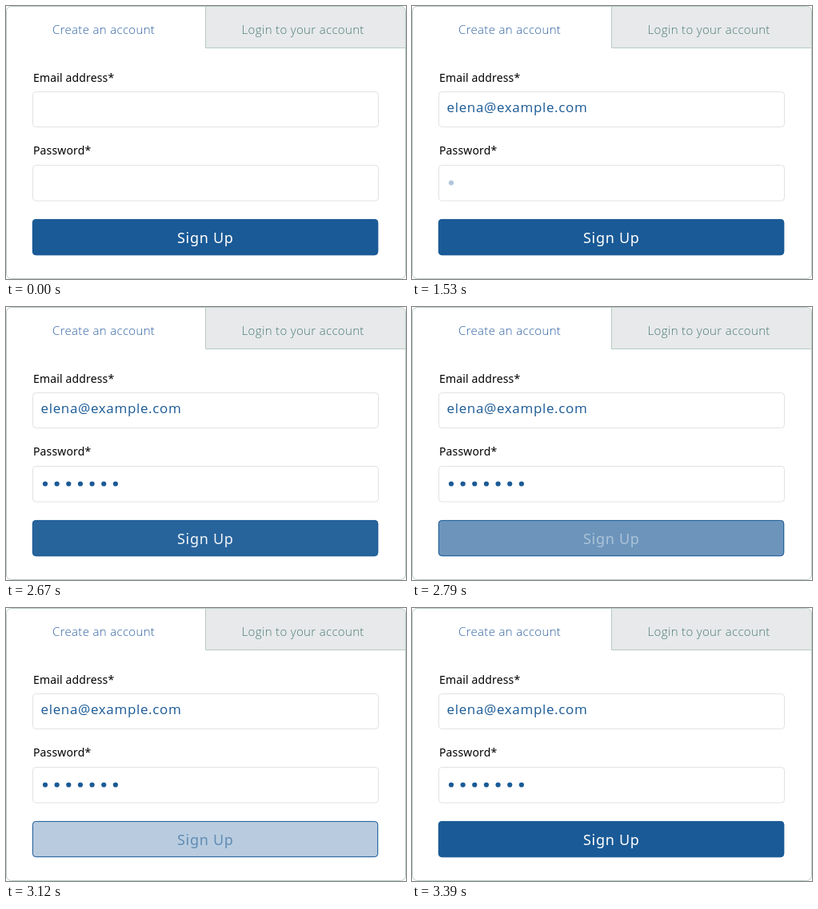
An HTML page that plays this animation: 500x342 px, repeating every 3.93 s.

```html
<!DOCTYPE html>
<html lang="en">
<head>
<meta charset="utf-8">
<title>Sign-up form</title>
<style>
  html, body { margin: 0; width: 100%; height: 100%; overflow: hidden; background: #fff; }
  svg { display: block; }
  text { font-family: "Noto Sans", "Open Sans", sans-serif; }
  .tab { font: 300 15px "Open Sans", "Noto Sans", sans-serif; letter-spacing: .33px; }
  .label { font-size: 14px; letter-spacing: .15px; }
  .field { fill: #fff; stroke: #dfe2e4; }
  .blue { fill: #1a5a96; }
  .frame { fill: none; stroke: #b7cbc5; }
  #email { font: 17px "Open Sans", "Noto Sans", sans-serif; letter-spacing: .65px; }
  .caption { font-size: 18px; letter-spacing: .7px; text-anchor: middle; }
</style>
</head>
<body>
<svg width="500" height="342" viewBox="0 0 500 342">
  <path d="M250 1H493Q499 1 499 7V52H250Z" fill="#e7e9eb"/>
  <path class="frame" d="M249.5 1V52.5H499"/>
  <rect class="frame" x=".5" y=".5" width="499" height="341" rx="6"/>
  <text class="tab" x="58" y="35" fill="#2f62a3">Create an account</text>
  <text class="tab" x="294.6" y="35" fill="#4a7a72">Login to your account</text>

  <text class="label" x="34" y="94.5">Email address*</text>
  <rect class="field" x="33.5" y="107.5" width="432" height="44" rx="4"/>
  <text id="email" class="blue" x="43.5" y="133"><tspan id="typed"></tspan><tspan id="next"></tspan></text>

  <text class="label" x="34" y="185.5">Password*</text>
  <rect class="field" x="33.5" y="199.5" width="432" height="44.5" rx="4"/>
  <g id="dots" class="blue"></g>

  <rect x="33.4" y="267.4" width="431.3" height="44.3" rx="4" fill="#fff" stroke="#1a5a96"/>
  <text class="caption blue" x="249.3" y="296.5">Sign Up</text>
  <g id="solid">
    <rect class="blue" x="32.9" y="266.9" width="432.3" height="45.3" rx="4.5"/>
    <text class="caption" x="249.3" y="296.5" fill="#fff">Sign Up</text>
  </g>
</svg>
<script>
  const LOOP = 3930, STEP = 30;
  const ADDRESS = "elena@example.com";
  const DOT_COUNT = 7;
  const $ = id => document.getElementById(id);
  const clamp = v => Math.max(0, Math.min(1, v));
  const ramp = (t, from, to) => clamp((t - from) / (to - from));

  const dots = Array.from({ length: DOT_COUNT }, (_, i) => {
    const dot = document.createElementNS("http://www.w3.org/2000/svg", "circle");
    dot.setAttribute("cx", 49 + 14.65 * i);
    dot.setAttribute("cy", 221.5);
    dot.setAttribute("r", 3.1);
    return $("dots").appendChild(dot);
  });

  function draw(t) {
    // Each character fades in during its own slot.
    const chars = ramp(t, 150, 1200) * ADDRESS.length;
    const whole = Math.floor(chars);
    $("typed").textContent = ADDRESS.slice(0, whole);
    $("next").textContent = ADDRESS.charAt(whole);
    $("next").setAttribute("fill-opacity", chars - whole);

    const shown = ramp(t, 1500, 2100) * DOT_COUNT;
    dots.forEach((dot, i) => dot.setAttribute("opacity", clamp(shown - i)));

    // The solid button fades out and back to show the outlined one.
    const press = clamp(1 - Math.abs(t - 3015) / 375);
    $("solid").setAttribute("opacity", 1 - press ** 1.1);
  }

  const start = performance.now();
  function tick() {
    const t = (performance.now() - start) % LOOP;
    draw(Math.floor(t / STEP) * STEP);
    requestAnimationFrame(tick);
  }
  tick();
</script>
</body>
</html>
```
